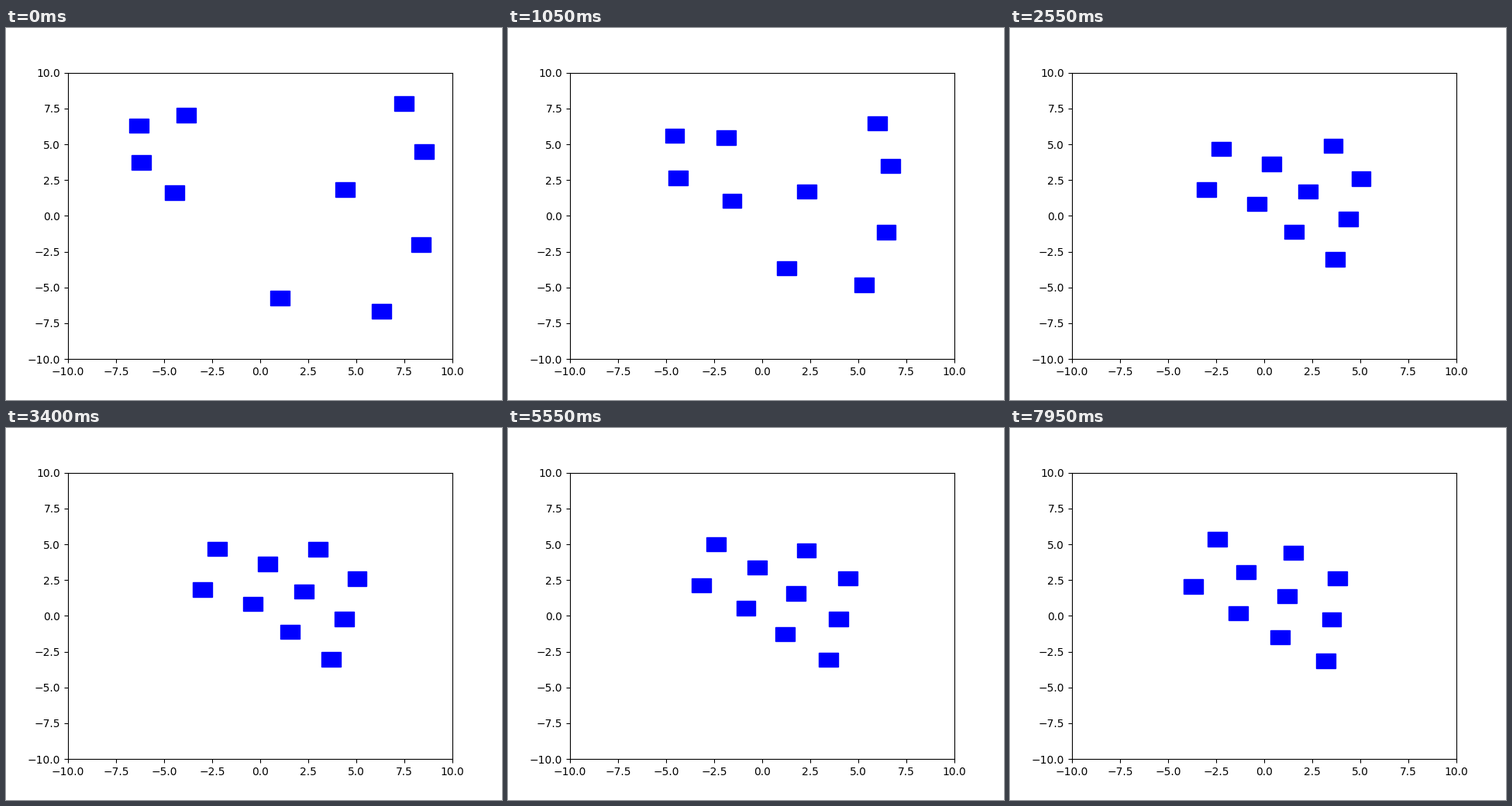
A matplotlib script that plays this animation: 640x480 px, repeating every 8 s.

```python
import matplotlib.pyplot as plt
import numpy as np
from matplotlib.animation import FuncAnimation
from matplotlib.patches import Rectangle

FRAMES, INTERVAL = 160, 50
SETTLED = 68            # frame when the whole pack is in place
PIVOT = np.array([4.17, -6.88])
TURN = 0.13             # radians the pack swings until the loop ends


def walk(route, dist):
    """Point reached after going dist along a polyline, stopping at its end."""
    route = np.array(route)
    steps = np.hypot(*np.diff(route, axis=0).T)
    marks = np.concatenate([[0], np.cumsum(steps)])
    return np.array([np.interp(dist, marks, axis) for axis in route.T])


def swing(p, t):
    """Turn with the pack around the pivot."""
    c, s = np.cos(TURN * t), np.sin(TURN * t)
    return PIVOT + np.array([[c, -s], [s, c]]) @ (p - PIVOT)


def stray(vel, bend):
    """Drift on a parabola, loose from the pack."""
    return lambda p, t: p + np.array(vel) * t + np.array(bend) * t * t


# Each agent: route to its slot, pace per frame, motion once settled.
AGENTS = [
    ([(-6.31, 6.30), (-2.24, 4.68)], 0.09, stray((-0.48, 0.72), (0.28, -0.05))),
    ([(-3.85, 7.03), (0.38, 3.62)], 0.12, swing),
    ([(-6.19, 3.73), (-3.00, 1.83)], 0.10, stray((0, 1.08), (-0.69, -0.87))),
    ([(-4.46, 1.62), (-0.38, 0.83)], 0.14, swing),
    ([(4.42, 1.83), (2.28, 1.70)], 0.10, swing),
    ([(7.48, 7.84), (4.90, 5.43), (3.00, 4.65)], 0.097, swing),
    ([(8.53, 4.49), (5.04, 2.59)], 0.10, swing),
    ([(8.37, -2.01), (4.37, -0.22)], 0.10, swing),
    ([(1.03, -5.74), (1.55, -1.11)], 0.10, swing),
    ([(6.31, -6.66), (4.37, -3.17), (3.69, -3.04)], 0.10, swing),
]

fig, ax = plt.subplots(figsize=(6.4, 4.8), dpi=100)
ax.set_xlim(-10, 10)
ax.set_ylim(-10, 10)
boxes = [ax.add_patch(Rectangle((0, 0), 1, 1, color="blue")) for _ in AGENTS]


def update(frame):
    t = max(0, frame - SETTLED) / (FRAMES - 1 - SETTLED)
    for box, (route, pace, drift) in zip(boxes, AGENTS):
        box.set_xy(drift(walk(route, pace * frame), t) - 0.5)
    return boxes


anim = FuncAnimation(fig, update, frames=FRAMES, interval=INTERVAL,
                     init_func=lambda: update(0), repeat=True, repeat_delay=0)
plt.show()
```
